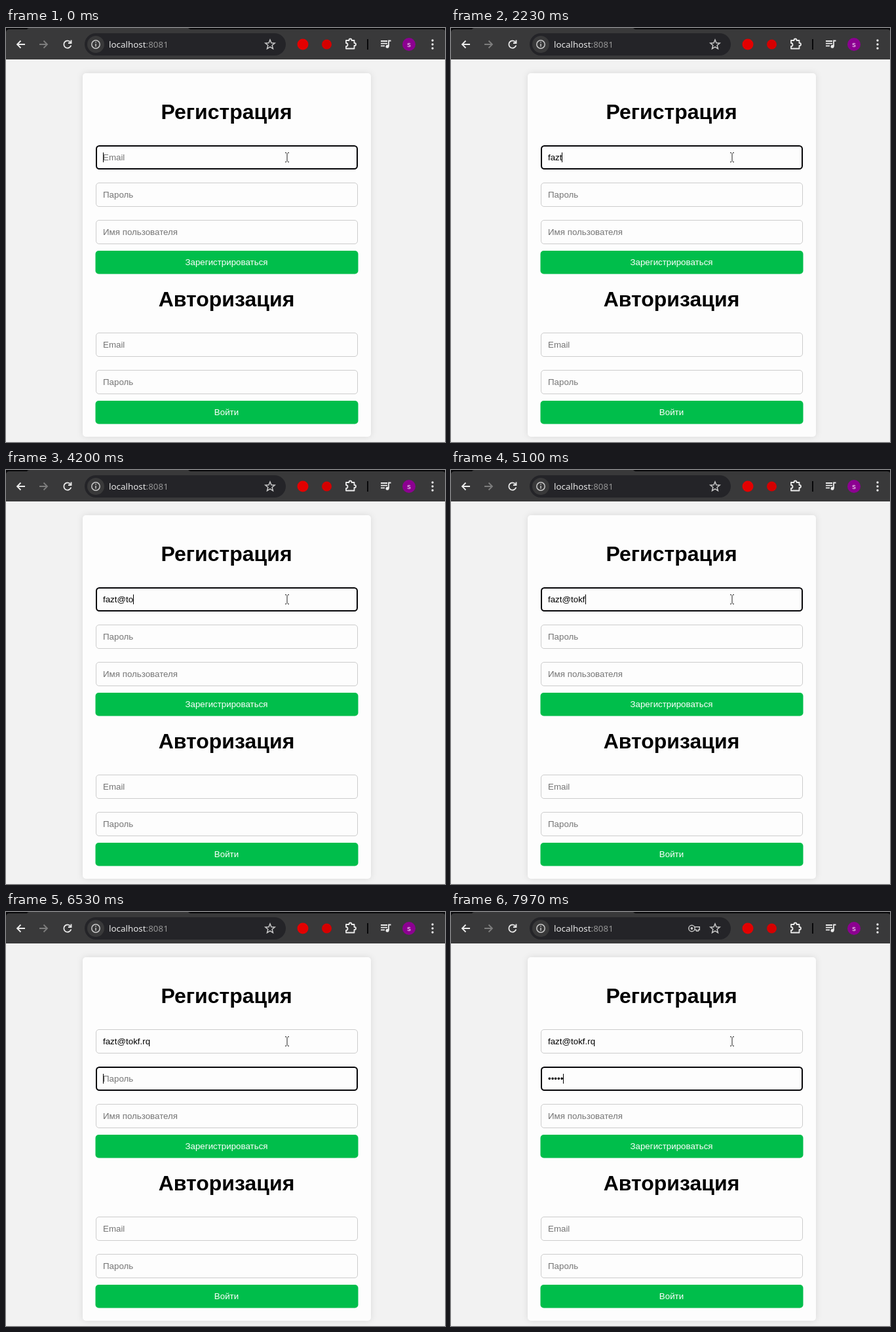
Animation of 670 by 632 pixels, one loop 8000 ms. Source, as an HTML page:

```html
<!DOCTYPE html>
<html lang="ru">
<head>
<meta charset="utf-8">
<title>Регистрация</title>
<style>
  html, body { margin: 0; width: 100%; height: 100%; overflow: hidden; background: #f2f2f2; }
  svg { display: block; width: 670px; height: 632px; }
  text { font: 13.333px "Liberation Sans", Arial, sans-serif; white-space: pre; }
  .title { font-size: 32px; font-weight: bold; text-anchor: middle; }
  .url { font: 13.4px "Noto Sans", sans-serif; fill: #e8e8e8; }
  .hint { fill: #757575; }
  .label { fill: #fff; text-anchor: middle; }
  .field { fill: #fdfdfd; stroke: #ccc; }
  .field.focus { stroke: #050508; stroke-width: 2; }
  .card { fill: #fdfdfd; filter: drop-shadow(0 0 5px rgba(0, 0, 0, .1)); }
  .line { fill: none; stroke: #ececec; stroke-width: 1.8; }
  .soft { stroke: #c7c7c7; stroke-width: 1.5; }
</style>
</head>
<body>
<svg viewBox="0 0 670 632">
  <rect width="670" height="632" fill="#f2f2f2"/>
  <rect class="card" x="117" y="69" width="440" height="555" rx="5"/>

  <g id="toolbar">
    <rect width="670" height="48" fill="#39393a"/>
    <path d="M0 0H36Q33 0 32 2H5Q1 2 0 6ZM278 0H670V4Q669 2 666 2H282Q280 2 278 0Z" fill="#08080a"/>
    <rect x="120" y="8" width="307" height="34" rx="17" fill="#242428"/>
    <circle cx="137" cy="25" r="13" fill="#39393a"/>
    <path class="line" d="M29 25H17M22.5 19.5 17 25l5.5 5.5"/>
    <path class="line" d="M51 25H63M57.5 19.5 63 25l-5.5 5.5" style="stroke:#7d7d7d"/>
    <path class="line" d="M98.3 21.5A5.6 5.6 0 1 0 99.3 26.5M99.5 18.5V23H95"/>
    <circle class="line soft" cx="137" cy="25" r="6.2"/>
    <path class="line soft" d="M137 24V28.5M137 21V22.6"/>
    <text class="url" x="157" y="29.5">localhost<tspan fill="#959595">:8081</tspan></text>
    <path id="star" class="line soft"/>
    <g id="key" class="line soft">
      <circle cx="367.5" cy="25" r="4.7"/>
      <circle cx="367.5" cy="25" r="1.2" fill="#c7c7c7"/>
      <path d="M371.5 22.8H379.3V27.2H377.5V29H374.5V27.2H371.5"/>
    </g>
    <circle cx="453" cy="25" r="8.5" fill="#e30000"/>
    <circle cx="489.5" cy="25" r="7.5" fill="#d50000"/>
    <path class="line" stroke-linejoin="round" d="M519 19H523.5V18.5A2 2 0 0 1 527.5 18.5V19H531.5V23H532A2 2 0 0 1 532 27H531.5V31.5H519V28A2.4 2.4 0 0 0 519 23Z"/>
    <path d="M552 17V33" stroke="#08080a" stroke-width="2"/>
    <path class="line" d="M572 20H582M572 23.7H582M572 27.4H578M584 28V19.5H587.5"/>
    <circle cx="582" cy="28.3" r="2.5" fill="#ececec"/>
    <circle cx="615" cy="25" r="10" fill="#8c0091"/>
    <text x="615" y="28.5" text-anchor="middle" fill="#fff3ff" style="font-size:11px">s</text>
    <g fill="#ececec">
      <circle cx="651" cy="19" r="1.7"/><circle cx="651" cy="25" r="1.7"/><circle cx="651" cy="31" r="1.7"/>
    </g>
  </g>

  <text class="title" x="336.5" y="139">Регистрация</text>
  <text class="title" x="336.5" y="425">Авторизация</text>
  <g id="form"></g>
  <rect id="caret" width="1" height="15"/>
  <path d="M426 190.5H428M430 190.5H432M429 191V204M426 204.5H428M430 204.5H432" fill="none" stroke="#222"/>
</svg>
<script>
const LOOP = 8000, BLINK = 500, LEFT = 148;
const EMAIL = "fazt@tokf.rq";
const emailKeys = [1000, 1300, 1600, 1900, 2800, 3650, 3900, 4650, 4900, 5300, 5550, 5800];
const tabKey = 6250;
const passwordKeys = [6900, 7120, 7330, 7600, 7820];
const allKeys = [0, ...emailKeys, tabKey, ...passwordKeys];

const byId = id => document.getElementById(id);
const form = byId("form"), caret = byId("caret"), key = byId("key");

function add(tag, attrs, content = "") {
  const el = document.createElementNS("http://www.w3.org/2000/svg", tag);
  for (const name in attrs) el.setAttribute(name, attrs[name]);
  el.textContent = content;
  return form.appendChild(el);
}

function addField(y, hint) {
  const box = add("rect", { class: "field", rx: 4.5 });
  const text = add("text", { x: LEFT, y: y + 23 });
  const field = {
    y,
    show(value, focused) {
      const inset = focused ? 1 : 0.5;
      box.classList.toggle("focus", focused);
      box.setAttribute("x", 137 + inset);
      box.setAttribute("y", y + inset);
      box.setAttribute("width", 400 - 2 * inset);
      box.setAttribute("height", 37 - 2 * inset);
      text.setAttribute("class", value ? "" : "hint");
      text.textContent = value || hint;
    },
    end: value => LEFT + (value ? text.getComputedTextLength() : 0)
  };
  field.show("", false);
  return field;
}

function addButton(y, label) {
  add("rect", { x: 136.5, y, width: 401, height: 35.5, rx: 5, fill: "#00be4b" });
  add("text", { class: "label", x: 336.5, y: y + 22 }, label);
}

const email = addField(179, "Email");
const password = addField(236, "Пароль");
addField(293, "Имя пользователя");
addButton(340, "Зарегистрироваться");
addField(465, "Email");
addField(522, "Пароль");
addButton(569, "Войти");

const starPoints = Array.from({ length: 10 }, (_, i) => {
  const angle = (i / 5 - 0.5) * Math.PI, radius = i % 2 ? 3.3 : 7.5;
  return `${403 + radius * Math.cos(angle)} ${25.5 + radius * Math.sin(angle)}`;
});
byId("star").setAttribute("d", `M${starPoints.join("L")}Z`);

const pressed = (keys, time) => keys.filter(at => at <= time).length;

function draw() {
  const time = performance.now() % LOOP;
  const onPassword = time >= tabKey;
  const address = EMAIL.slice(0, pressed(emailKeys, time));
  const dots = "•".repeat(pressed(passwordKeys, time));
  email.show(address, !onPassword);
  password.show(dots, onPassword);
  key.style.display = dots ? "" : "none";

  const field = onPassword ? password : email;
  const sinceKey = time - allKeys[pressed(allKeys, time) - 1];
  caret.setAttribute("x", Math.round(field.end(onPassword ? dots : address)));
  caret.setAttribute("y", field.y + 11);
  caret.style.display = Math.floor(sinceKey / BLINK) % 2 ? "none" : "";
  requestAnimationFrame(draw);
}
draw();
</script>
</body>
</html>
```
